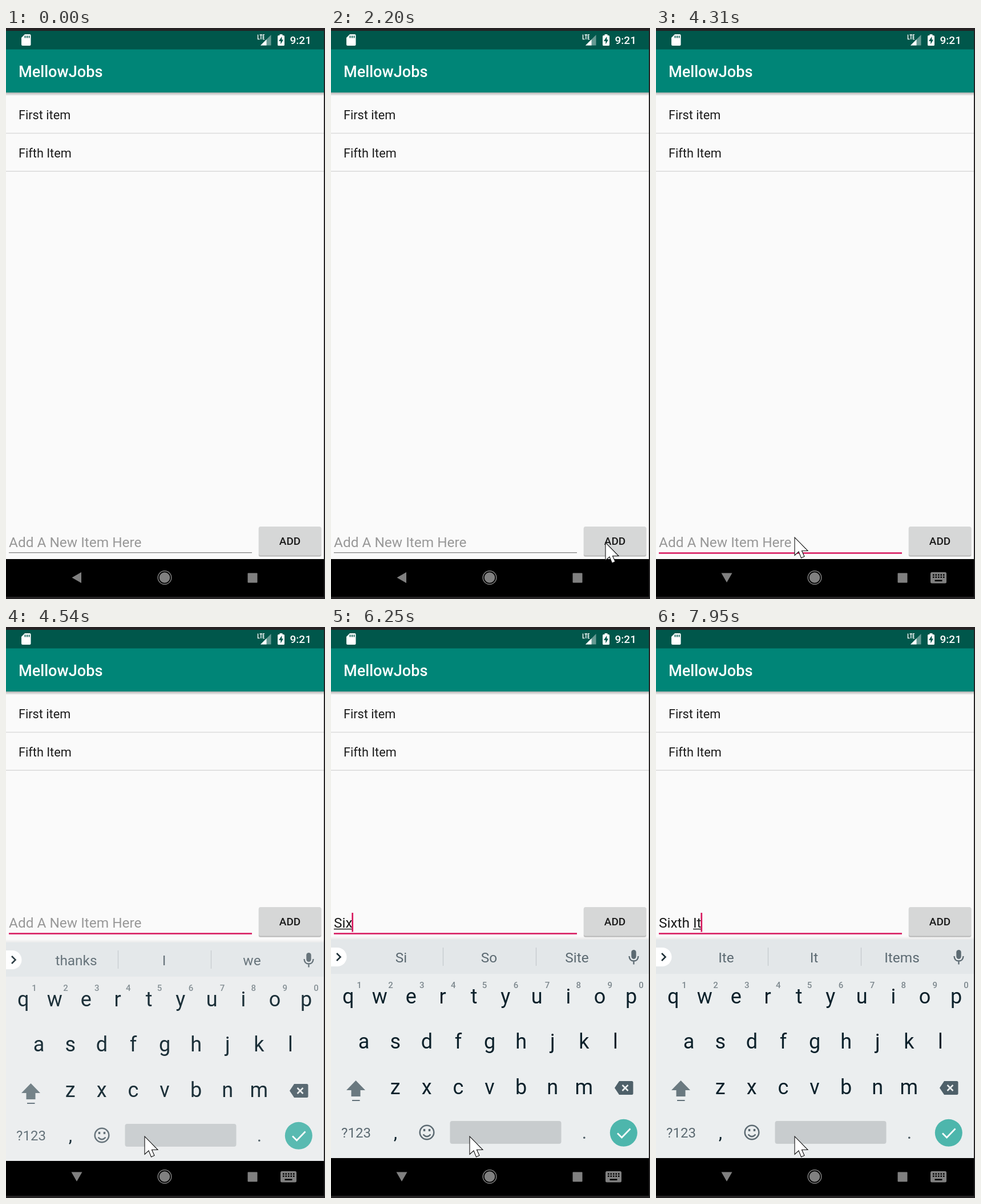
Animation, 559 px wide and 1001 px high, one loop 8000 ms. Source, as an HTML page:

```html
<!DOCTYPE html>
<html lang="en">
<head>
<meta charset="utf-8">
<title>To-do list</title>
<style>
html, body { margin: 0; width: 100%; height: 100%; overflow: hidden; background: #252324; }
svg { display: block; width: 100vw; height: 100vh; font-family: Roboto, sans-serif; }
text { white-space: pre; }
.mid { text-anchor: middle; }
.med { font-weight: 500; }
.item { font-size: 21.7px; fill: #1b1b1b; }
.edit { font-size: 24.4px; }
.key { font-size: 36px; fill: #0c212b; }
.num { font-size: 15px; font-weight: 500; fill: #7d888e; }
.word { font-size: 24.4px; fill: #5c6a72; }
</style>
</head>
<body>
<svg viewBox="0 0 559 1001" preserveAspectRatio="none">
  <defs>
    <linearGradient id="fade" x2="0" y2="1">
      <stop stop-color="#000" stop-opacity=".3"/>
      <stop offset="1" stop-color="#000" stop-opacity="0"/>
    </linearGradient>
    <linearGradient id="rise" x2="0" y2="1">
      <stop stop-color="#000" stop-opacity="0"/>
      <stop offset="1" stop-color="#000" stop-opacity=".07"/>
    </linearGradient>
  </defs>

  <rect width="559" height="1001" fill="#252324"/>
  <rect y="5" width="557" height="992" fill="#fafafa"/>

  <!-- status and app bars -->
  <rect y="113" width="557" height="6" fill="url(#fade)"/>
  <rect y="37" width="557" height="76" fill="#008577"/>
  <rect y="5" width="557" height="32.5" fill="#00574b"/>
  <g fill="#fff">
    <path d="M33 11H41.5Q43.5 11 43.5 13V29Q43.5 31 41.5 31H29Q27 31 27 29V17Z"/>
    <path d="M33.5 13.5v4M37 13.5v4M40.5 13.5v4" stroke="#00574b" stroke-width="1.8"/>
    <path d="M441.5 11.5V19.5H444.5M444.5 12H449M446.8 12V20M453 12H450.5V19.5H453M450.5 15.7H452.7" fill="none" stroke="#fff" stroke-width="1.4"/>
    <path d="M446 30.5L464.5 12V30.5Z" opacity=".4"/>
    <path d="M446 30.5L456.5 20V30.5Z"/>
    <path d="M476 14.5Q476 13 477.5 13H479.500V11H484.500V13H486.500Q488 13 488 14.500V29.500Q488 31 486.500 31H477.500Q476 31 476 29.500Z"/>
    <path d="M483.300 15L478 23H481.300V28.500L486 20.500H483.300Z" fill="#00574b"/>
    <text class="med" x="497.500" y="28.300" font-size="19">9:21</text>
    <text class="med" x="22" y="86" font-size="27.100">MellowJobs</text>
  </g>

  <!-- list -->
  <text class="item" x="22" y="160">First item</text>
  <text class="item" x="22" y="226.500">Fifth Item</text>
  <path d="M0 184.500H557M0 251.300H557" stroke="#dadada" stroke-width="1.500"/>

  <!-- entry row -->
  <g id="entry">
    <text id="typed" class="edit" x="5" y="910"></text>
    <rect id="compose" y="911.800" height="1.500" fill="#1b1b1b"/>
    <rect id="line" x="5" width="426"/>
    <rect id="caret" y="884" width="2.700" height="33.500" fill="#d81b60"/>
    <rect x="442.500" y="875" width="110.500" height="52" rx="3" opacity=".1"/>
    <rect x="443" y="876" width="109" height="50.500" rx="3" opacity=".17"/>
    <rect x="443" y="874" width="109" height="50.500" rx="3" fill="#d6d7d7"/>
    <text class="mid med" x="497.500" y="906" font-size="19" fill="#1b1b1b">ADD</text>
  </g>

  <!-- keyboard -->
  <g id="board">
    <rect y="542" width="557" height="6" fill="url(#rise)"/>
    <rect y="548" width="557" height="383" fill="#ebeeef"/>
    <rect y="931" width="557" height="30" fill="#d0d4d5"/>
    <rect y="548" width="557" height="60" fill="#e3e7e9"/>
    <path d="M0 562H11A16.500 16.500 0 0 1 11 595H0Z" fill="#fff"/>
    <path d="M10 572L16.500 578.500L10 585" fill="none" stroke="#1f3038" stroke-width="2.600"/>
    <path d="M196.500 562V594M359.500 562V594" stroke="#c5cbce" stroke-width="1.300"/>
    <g id="words"></g>
    <rect x="526.300" y="566" width="8.400" height="16" rx="4.200" fill="#5c6a72"/>
    <path d="M522.500 577Q523 585.500 530.500 585.500T538.500 577M530.500 586V591.500" fill="none" stroke="#5c6a72" stroke-width="2.300"/>
    <g id="keys"></g>
    <path id="shift" d="M43.500 795L60 812H51.500V823H35.500V812H27Z"/>
    <path d="M37 830H50.500" stroke="#62717a" stroke-width="2"/>
    <path d="M505 796H527Q529.500 796 529.500 798.500V817.500Q529.500 820 527 820H505L497 808Z" fill="#4e6069"/>
    <path d="M510.500 803L520.500 813M520.500 803L510.500 813" stroke="#ebeeef" stroke-width="2.600"/>
    <text class="mid" x="44" y="895" font-size="24" fill="#5c6a72">?123</text>
    <text class="mid" x="113" y="897" font-size="32" fill="#0c212b">,</text>
    <text class="mid" x="444" y="897" font-size="32" fill="#4a5a62">.</text>
    <g fill="none" stroke="#5c6a72" stroke-width="2.500">
      <circle cx="168" cy="886" r="12.300"/>
      <path d="M161.500 889.500Q168 897 174.500 889.500" />
      <path d="M163.500 880V884M172.500 880V884" stroke-width="3.500"/>
    </g>
    <rect x="208.500" y="866" width="195" height="40" rx="4" fill="#c8ccce"/>
    <circle cx="512.800" cy="886.800" r="24" fill="#4db6ac"/>
    <path d="M502 887.500L509.500 895L524.500 879.500" fill="none" stroke="#fff" stroke-width="2.700"/>
  </g>

  <!-- navigation bar -->
  <rect id="nav" width="557"/>
  <g fill="#808080">
    <path id="back"/>
    <circle cx="278" cy="963.500" r="9.300"/>
    <circle cx="278" cy="963.500" r="11.800" fill="none" stroke="#808080" stroke-width="1.500"/>
    <rect x="423.500" y="955.500" width="17" height="17" rx="1"/>
    <g id="imeIcon">
      <rect x="481" y="954" width="28" height="19.500" rx="2.500"/>
      <path d="M485 958.700H506M485 962.700H506" stroke="#000" stroke-width="2.500" stroke-dasharray="2.500 2"/>
      <path d="M488.500 968.800H501.500" stroke="#000" stroke-width="2.500"/>
    </g>
  </g>

  <path id="pointer" d="M0 0V31.500L7 25L11.500 36L17 33.500L12.500 23.500H23Z" fill="#fff" stroke="#111" stroke-width="1.100"/>
</svg>

<script>
const LOOP = 8000;
const RAISE = 383;
const $ = id => document.getElementById(id);
const el = {};
for (const id of ['entry', 'typed', 'compose', 'line', 'caret', 'board', 'words',
  'keys', 'shift', 'nav', 'back', 'imeIcon', 'pointer']) el[id] = $(id);

// Each track is a list of [start, ...values]; values hold until the next start.
const pointerTrack = [
  [90, 484, 985], [167, 476, 955], [243, 471, 925], [320, 484, 903],
  [2200, 481, 902], [2275, 440, 860], [2350, 385, 780], [2425, 335, 690], [2500, 309, 644],
  [2750, 300, 665], [2827, 280, 730], [2904, 255, 800], [2981, 230, 860],
  [3058, 212, 895], [3135, 203, 907], [3213, 200, 902], [3290, 198, 895],
  [3460, 176, 887], [3690, 198, 895], [3990, 206, 905], [4075, 225, 902], [4160, 243, 893]
];
const typedTrack = [
  [0, ''], [5635, 'S'], [5720, 'Si'], [6250, 'Six'], [6335, 'Sixt'],
  [6650, 'Sixth'], [6800, 'Sixth '], [7110, 'Sixth I'], [7265, 'Sixth It']
];
const wordTrack = [
  [0, 'thanks I we'], [5720, 'Si So Site'], [6335, 'Six Sox Sixth'], [6420, 'Sixt Six Sixty'],
  [6650, 'Sixty Sixth Sixths'], [6800, 'and grade floor'], [7190, 'In I It'],
  [7340, 'Its It Item'], [7420, 'Its It Instance'], [7880, 'Ite It Items']
];
const caretTrack = [
  [0, false], [3610, true], [4310, false], [5170, true], [5550, false],
  [5635, true], [7880, false], [7950, true]
];
const boardTrack = [[4460, 20, .5], [4540, 5, .93], [4620, 0, 1]];

const at = (track, t) => track.findLast(step => step[0] <= t);
const show = (node, on) => node.setAttribute('display', on ? 'inline' : 'none');
const set = (node, attrs) => {
  for (const name in attrs) node.setAttribute(name, attrs[name]);
};

function addText(parent, cls, x, y, content = '') {
  const node = document.createElementNS('http://www.w3.org/2000/svg', 'text');
  set(node, { class: 'mid ' + cls, x, y });
  node.textContent = content;
  parent.append(node);
  return node;
}

const words = [123, 277, 431].map(x => addText(el.words, 'word', x, 587.5));
const keys = [];
[['qwertyuiop', 30.2], ['asdfghjkl', 57.6], ['zxcvbnm', 112.6]].forEach(([row, left], r) => {
  [...row].forEach((letter, i) => {
    const node = addText(el.keys, 'key', left + 55.1 * i, 0);
    keys.push({ node, letter, base: 659.5 + 79.7 * r });
    if (r === 0) addText(el.keys, 'num', 49.5 + 54.9 * i, 632.5, (i + 1) % 10);
  });
});

function drawEntry(t, raised) {
  const typed = at(typedTrack, t)[1];
  const focused = t >= 3610;
  set(el.entry, { transform: `translate(0 ${raised ? -RAISE : 0})` });

  el.typed.textContent = typed;
  const end = 5 + (typed ? el.typed.getComputedTextLength() : 0);
  const start = typed.lastIndexOf(' ') + 1;
  const from = start ? 5 + el.typed.getSubStringLength(0, start) : 5;
  set(el.compose, { x: from, width: Math.max(0, end - from) });
  set(el.caret, { x: Math.max(5, end - 1.2) });
  show(el.caret, at(caretTrack, t)[1]);

  if (!typed) el.typed.textContent = 'Add A New Item Here';
  set(el.typed, { fill: typed ? '#1b1b1b' : '#989898' });
  set(el.line, focused
    ? { y: 919.2, height: 2.6, fill: '#d81b60' }
    : { y: 919, height: 1.4, fill: '#8b8b8b' });
}

function drawBoard(t, pose) {
  show(el.board, pose);
  const drop = pose ? pose[1] : 0;
  set(el.nav, { y: 931 + drop, height: 66 - drop });
  if (!pose) return;
  set(el.board, { transform: `translate(0 ${drop})`, opacity: pose[2] });
  const upper = t >= 4620 && t < 5635;
  for (const { node, letter, base } of keys) {
    node.textContent = upper ? letter.toUpperCase() : letter;
    set(node, { y: base + (upper ? 3.3 : 0) });
  }
  set(el.shift, { fill: upper ? '#4db6ac' : '#6a7980' });
  at(wordTrack, t)[1].split(' ').forEach((word, i) => { words[i].textContent = word; });
}

function draw(t) {
  const pose = at(boardTrack, t);
  drawEntry(t, pose);
  drawBoard(t, pose);

  const ime = t >= 4310;
  set(el.back, { d: ime ? 'M114.5 955.5H133.500L124 972Z' : 'M115.500 963.500L132 954V973Z' });
  show(el.imeIcon, ime);

  const spot = at(pointerTrack, t);
  show(el.pointer, spot);
  if (spot) set(el.pointer, { transform: `translate(${spot[1]} ${spot[2]})` });
}

const began = performance.now();
function tick() {
  draw((performance.now() - began) % LOOP);
  requestAnimationFrame(tick);
}
tick();
</script>
</body>
</html>
```
